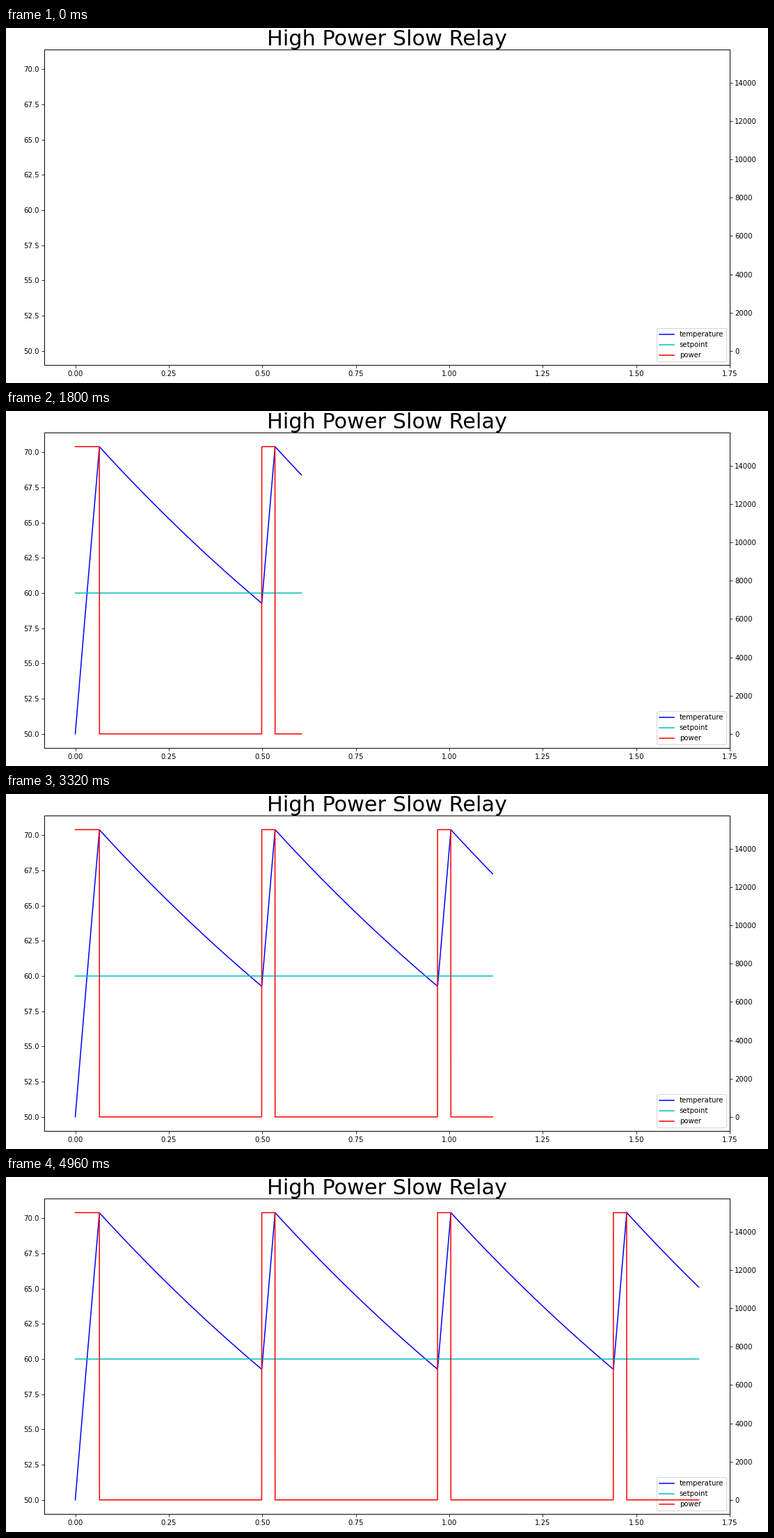
Write a matplotlib script that moves like this. It is 1095 px wide and 511 px high and loops after 5000 ms.

```python
import numpy as np
import matplotlib.pyplot as plt
from matplotlib.animation import FuncAnimation

FRAMES, INTERVAL = 125, 40

DURATION = 6000            # seconds
SETPOINT, POWER = 60, 15000
START, TROUGH, PEAK = 50, 59.27, 70.39
FIRST_OFF, FIRST_ON = 233, 1795
HEATING, CYCLE = 128, 1692
LOSS = 1.67e-4             # heat loss rate per second


def relax(t, span, start, end):
    """Exponential approach from start to end over span seconds."""
    return start + (end - start) * np.expm1(-LOSS * t) / np.expm1(-LOSS * span)


seconds = np.arange(DURATION + 1)
phase = (seconds - FIRST_ON) % CYCLE
warming_up = seconds < FIRST_OFF
heating = warming_up | ((seconds >= FIRST_ON) & (phase < HEATING))

hours = seconds / 3600
power = np.where(heating, POWER, 0)
setpoint = np.full(hours.shape, SETPOINT)
temperature = np.select(
    [warming_up, heating],
    [relax(seconds, FIRST_OFF, START, PEAK),
     relax(phase, HEATING, TROUGH, PEAK)],
    relax(phase - HEATING, CYCLE - HEATING, PEAK, TROUGH))

plt.rcParams["font.family"] = "DejaVu Sans"
fig, ax = plt.subplots(figsize=(15, 7), dpi=73)
fig.subplots_adjust(left=0.05, right=0.95, bottom=0.05, top=0.94)
power_ax = ax.twinx()

ax.set_title("High Power Slow Relay", fontsize=30, y=1, pad=6)
ax.set_xlim(-1 / 12, 1.75)
ax.set_xticks(np.arange(0, 1.76, 0.25))
margin = 0.05 * (PEAK - START)
ax.set_ylim(START - margin, PEAK + margin)
ax.set_yticks(np.arange(50, 70.1, 2.5))
power_ax.set_ylim(-0.05 * POWER, 1.05 * POWER)
power_ax.set_yticks(range(0, POWER, 2000))

series = [temperature, setpoint, power]
lines = [
    ax.plot([], [], "b", label="temperature")[0],
    ax.plot([], [], "c", label="setpoint")[0],
    power_ax.plot([], [], "r", label="power")[0],
]
ax.legend(handles=lines, loc="lower right")


def update(frame):
    count = round(frame * len(hours) / (FRAMES - 1))
    for line, values in zip(lines, series):
        line.set_data(hours[:count], values[:count])
    return lines


animation = FuncAnimation(fig, update, frames=FRAMES, interval=INTERVAL,
                          init_func=lambda: update(0), repeat=True, repeat_delay=0)
plt.show()
```
